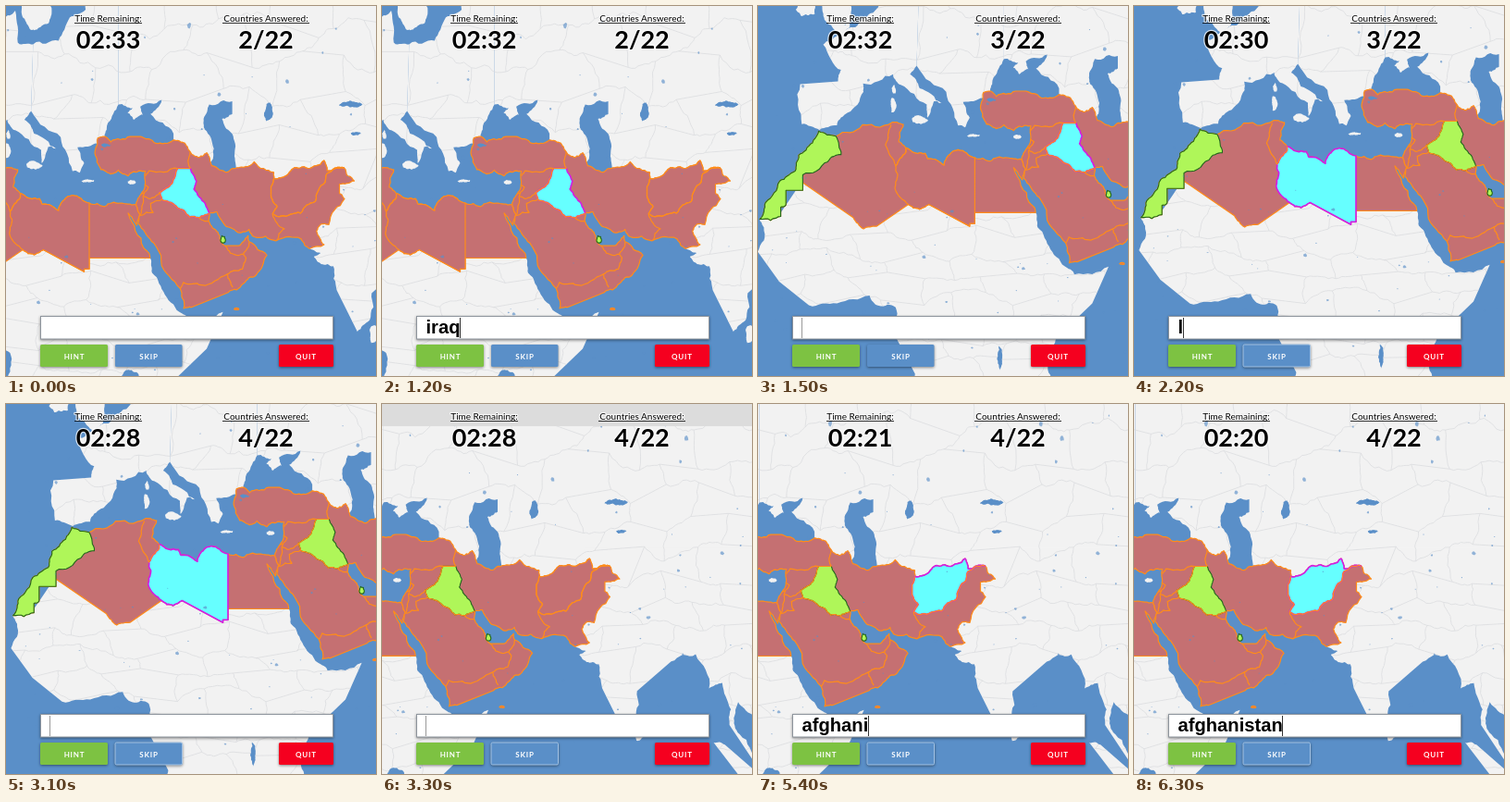
An HTML page that plays this animation: 400 px wide and 400 px high, repeating every 6500 ms.

```html
<!DOCTYPE html>
<html lang="en">
<head>
<meta charset="utf-8">
<title>Map quiz</title>
<style>
html, body { margin: 0; width: 100%; height: 100%; overflow: hidden; background: #5a8fc8; }
svg { display: block; width: 100vw; height: 100vh; }
.head, .btn { font-family: Lato, sans-serif; text-anchor: middle; }
.head { fill: #000; stroke: #fff; stroke-opacity: .75; stroke-width: 2.5; stroke-linejoin: round; paint-order: stroke; }
.label { font-size: 10px; }
.big { font-size: 27px; font-weight: 700; }
.btn { font-size: 8px; font-weight: 700; letter-spacing: .8px; fill: #fff; }
.typed { font: bold 20.2px "Liberation Sans", Arial, sans-serif; fill: #000; }
.shade { filter: drop-shadow(0 1px 1.5px rgba(0,0,0,.45)); }
</style>
</head>
<body>
<svg viewBox="0 0 400 400">
  <clipPath id="dry"></clipPath>
  <rect width="400" height="400" fill="#5a8fc8"/>
  <g id="world" stroke-linejoin="round">
    <g id="land" fill="#f2f2f2"></g>
    <g id="borders" fill="none" stroke="#d9dadd" stroke-width=".7" clip-path="url(#dry)"></g>
    <g id="states" fill="#c57072" stroke="#ff8c1a" stroke-width="1.2"></g>
    <g id="lakes" fill="#5a8fc8"></g>
    <rect id="strip" x="-250" y="-40" width="900" height="64" fill="#dcdcdc"/>
  </g>
  <g class="head">
    <text class="label" x="110.5" y="16.5">Time Remaining:</text>
    <text class="label" x="281" y="16.5">Countries Answered:</text>
    <text class="big" id="clock" x="110.5" y="45.5"></text>
    <text class="big" id="score" x="281" y="45.5"></text>
  </g>
  <path d="M74 18.5H147M234 18.5H328" stroke="#000" stroke-width=".8"/>
  <rect class="shade" x="37.5" y="335.5" width="316" height="24.5" fill="#fff" stroke="#8d949c"/>
  <text class="typed" id="typed" x="47.5" y="354"></text>
  <path id="caret" d="M0 337V359"/>
  <g class="shade">
    <rect x="37" y="366" width="73" height="24" rx="1.5" fill="#7dc242"/>
    <rect id="skip" x="118" y="366" width="72.5" height="24" rx="1.5" fill="#5a8fc8"/>
    <rect x="295" y="366" width="59" height="24" rx="1.5" fill="#f5001f"/>
  </g>
  <g class="btn">
    <text x="74" y="382">HINT</text>
    <text x="154.5" y="382">SKIP</text>
    <text x="324.5" y="382">QUIT</text>
  </g>
</svg>
<script>
const $ = id => document.getElementById(id);
const ring = (...parts) => parts.join();

// Seeded noise in 0..1 for a pair of numbers.
function noise(x, y) {
  const h = Math.sin(x * 127.1 + y * 311.7) * 43758.5;
  return h - Math.floor(h);
}

// Mercator
const project = ([lon, lat]) => [
  90 + (lon - 25) * 5.52,
  397 - 316.3 * Math.log(Math.tan(Math.PI / 4 + lat * Math.PI / 360))
];

// Roughens a segment the same way from either end, so neighbours still meet.
// Very long or axis-parallel segments are ruled desert borders.
function rough(a, b, depth = 3) {
  const [dx, dy] = [b[0] - a[0], b[1] - a[1]];
  if (!depth || !dx || !dy || Math.hypot(dx, dy) > 7) return [b];
  const [mx, my] = [(a[0] + b[0]) / 2, (a[1] + b[1]) / 2];
  const s = (noise(mx, my) - .5) * .26 * Math.sign(dx);
  const m = [mx - dy * s, my + dx * s];
  return [...rough(a, m, depth - 1), ...rough(m, b, depth - 1)];
}

const parse = text => text.split(",").map(p => p.split(" ").map(Number));

function trace(pts, closed) {
  const out = [pts[0]];
  for (let i = 1; i < pts.length + closed; i++) out.push(...rough(pts[i - 1], pts[i % pts.length]));
  return "M" + out.map(p => project(p).map(v => v.toFixed(1))).join("L") + (closed ? "Z" : "");
}

function add(parent, d, attrs = {}) {
  const el = document.createElementNS("http://www.w3.org/2000/svg", "path");
  el.setAttribute("d", d);
  for (const k in attrs) el.setAttribute(k, attrs[k]);
  return $(parent).appendChild(el);
}
const area = (parent, text) => add(parent, trace(parse(text), true));
const line = (parent, text) => add(parent, trace(parse(text), false), { fill: "none" });

// Uneven round patch for islands and lakes.
function blob(lon, lat, w, h) {
  const n = 9;
  return trace(Array.from({ length: n }, (_, i) => {
    const a = i / n * 2 * Math.PI, r = .75 + .45 * noise(lon + i, lat);
    return [lon + w * r * Math.cos(a), lat + h * r * Math.sin(a)];
  }), true);
}

// Continents, as a few key "lon lat" points
const africa = "-17.1 20.8,-16.3 19.3,-17.5 14.7,-13.3 9,-7.5 4.4,-2 4.8,4.4 6.3,6.2 4.3,9.5 4,9 -.8,13.3 -9,13 -12,41 -12,39.3 -7.5,39.2 -4.6,42 -1,48 4.8,51.2 11.9,44.5 10.4,43.2 11.6,39.8 15.2,37.3 19.3,36.9 22,25 25,0 26,-8.5 28,-13 22";
const westEurope = "14 54,11 54.2,10.5 57.7,8.2 56.8,8.6 54,4.5 52.3,1.6 50.6,-1.8 49.6,-4.7 48.4,-1.2 45,-1.8 43.4,-9.2 43,-8.9 37,-5.4 36.1,-2 36.8,.1 38.8,3.2 41.9,3.1 43.1,9 44.4,10.5 42.9,15.6 40,15.7 38,17 40.5,18.5 40.2,14.2 42.4,12.3 44.4,13.6 45.6";
const eastEurope = "13.6 45.6,19.4 41.9,21.7 36.8,23.1 36.5,24 38,22.7 40.4,26.7 41,28 42,28.7 44,30.7 46.5,30.7 60,24 60,24.3 57.8,21.2 57,19 54.4,14 54";
const northAsia = "30.7 60,30.7 46.5,33.5 46,32.5 45.4,33.7 44.4,35.5 45.1,35 46.2,39.2 47.1,37 45.2,41.5 42.4,41.5 41.5,44 39.5,48.9 38.2,49.4 40.2,47.6 43,47.4 44.5,48.5 46.5,53 46.9,53 45.2,51 44.5,52.7 42.6,53.5 39.8,53.9 37,61 35.5,105 35,105 60";
const southAsia = "68.2 23.7,70.3 22.9,69 22.2,70.4 20.9,72.8 20.5,73.5 16,77.5 8.1,79.9 10.3,80.3 15.5,87 21,91.8 22.3,94.4 16,97 17,98.7 12,98.4 9,103.5 1.4,100.4 7.2,99.3 9.3,100.1 13.4,103.5 10.6,105 10,105 40,70 40";
const sumatra = "95.3 5.6,97.5 5.2,103.5 0,103.5 -4,100.3 -.9";
for (const text of [africa, westEurope, eastEurope, northAsia, southAsia, sumatra]) {
  area("land", text);
  area("dry", text);
}
const islands = [[-2, 53, 3, 3.2], [-8, 53.3, 2, 1.5], [14.8, 58, 3, 2.6], [14.2, 37.6, 1.5, .7], [9, 40, .6, 1.1],
  [9.1, 42.2, .4, .7], [24.9, 35.2, 1.3, .25], [33.2, 35, .9, .4], [80.8, 7.7, 1, 1.7]];
islands.forEach(i => add("land", blob(...i)));

// Faint border network: a jittered brick pattern over dry land
const node = (i, j) => [i * 6 + 4 * noise(i, j), j * 4.2 + 3 * noise(j, i + 40)];
for (let i = -4; i < 18; i++) for (let j = -3; j < 14; j++) {
  add("borders", trace([node(i, j), node(i + 1, j)], false));
  if ((i + j) % 2) add("borders", trace([node(i, j), node(i, j + 1)], false));
}

// Shared edges of the quiz countries
const moroccoEdge = "-8.7 27.3,-8.7 26,-12 26,-12 23.4,-13 23,-13 21.3,-17.1 20.8,-16 23.8,-13.2 27.6,-10.2 29.3,-9.5 32,-6.8 34,-5.6 35.9,-2.2 35.1";
const libyaCoast = "11.5 33.2,15.3 32.3,15.8 31.4,19 30.3,20.1 32.1,21.7 32.9,25 31.6";
const libyaSouth = "25 20,24 20,24 19.5,16 23.5,14.2 22.6,12 23.5";
const egyptEdge = "28 31,31 31.6,34.2 31.3,34.9 29.5,34.3 27.8,32.6 29.9,35.6 23.9,36.9 22,25 22";
const turkeyCoast = "34.9 29.5,34.2 31.3,34.9 32.8,35.9 34.6,36 36.7,34.7 36.8,32.6 36,30.7 36.9,29.2 36.3,27.3 37,26.1 39.5,26.7 41.8,28 42,29.2 41.2,33 42,35 42,38 41,41.5 41.5,43.5 41.1,44.8 39.7";
const iranNorth = "46.5 38.9,48 39.6,49 37.6,52 36.6,53.9 37.3,57.3 38.2,61.1 36.6";
const afghanNorth = "61.2 35.6,63.2 35.9,64.8 37.1,67.8 37.2,71 38.4,71.6 36.8,74.9 37.3";
const afghanEast = "74.9 37.3,71.6 36.4,71.2 35,69.3 31.9,66.4 29.9,62.5 29.4,60.9 29.8";
const afghanWest = "60.9 29.8,61.8 31,60.6 33,60.6 34.3,61.2 35.6";
const pakistanEdge = "76.9 35.2,74 34.7,74 33.2,75 32.3,71.9 27.9,70.4 28,69.5 26.8,71 24.4,68.2 23.7,66.5 25.4,61.6 25.1";
const gulfCoast = "57.3 25.8,56.3 27.1,54.6 26.5,51.5 27.9,50 30.1,48.5 29.9,48.4 28.5,50.2 26.6,51.6 24.2,54.2 24.2,56.1 26,56.4 24.9";
const arabiaCoast = "59.8 22.5,57.7 18.9,55.2 17.3,52.2 15.6,45 12.8,43.5 12.6,42.8 16.4,39.1 21.4,37.2 25,34.6 28.1";
const iraqEast = "44.8 37.2,46 35.1,45.5 33.9,47.7 31.5,48.5 29.9";
const iraqWest = "48.5 29.9,46.5 29.1,44.7 29.2,42 31.1,39.2 32.2,38.8 33.4,41.2 34.8,42.3 37.2,44.8 37.2";

area("states", ring(moroccoEdge, "3 36.9,9.8 37.3,11 37,10.1 34.2", libyaCoast, egyptEdge, libyaSouth, "5.8 19.5,3.2 19,1.2 21.1"));
area("states", ring(turkeyCoast, iranNorth, afghanNorth, pakistanEdge, gulfCoast, arabiaCoast));
add("states", blob(53.9, 12.5, .5, .15));
const shapes = {
  afghanistan: area("states", ring(afghanNorth, afghanEast, afghanWest)),
  iraq: area("states", ring(iraqEast, iraqWest)),
  libya: area("states", ring(libyaCoast, libyaSouth, "9.4 26.2,9.9 28.7,9.5 30.2,11.5 32.5")),
  morocco: area("states", ring(moroccoEdge, "-1.2 32.1,-3.8 30.9,-8.7 28.7")),
  qatar: add("states", blob(51.2, 25.3, .4, .7))
};
const inner = [
  iraqWest, afghanWest, afghanEast,
  "8.6 36.9,7.5 33.7,9.5 30.2,11.5 32.5,11.5 33.2",
  "36 36,36.7 36.8,42.3 37.2",
  "44.8 39.7,44.4 38,44.8 37.2",
  "35.1 33.1,35.8 33.3,36.6 34.2,35.9 34.6",
  "35 29.5,35.5 31.5,35.8 33.3",
  "35.6 32.7,36.8 32.3,38.8 33.4",
  "35 29.5,37.5 30,37 31.5,39.2 32.2",
  "46.5 29.1,47.6 28.5,48.4 28.5",
  "42.8 16.4,43.4 17.5,47 17,52 19,53.1 16.6",
  "52 19,55 20,55.7 22,55.2 22.7,56.4 24.9",
  "55.2 22.7,52.6 22.9,51.6 24.2",
  "60.9 29.8,63.2 27.2,61.6 25.1"
];
inner.forEach(text => line("states", text));

const lakes = [[60.2, 45.4, .9, 1.2], [76, 46.5, 2.4, .4], [77.2, 42.4, 1, .25], [33, -1, 1.6, 1.5],
  [29.9, -6, .4, 2.6], [28.2, 40.7, 1, .22]];
lakes.forEach(l => add("lakes", blob(...l)));
for (let i = 0; i < 150; i++) {
  const size = .08 + .25 * noise(i, 3) ** 3;
  add("lakes", blob(-16 + 118 * noise(i, 1), -9 + 66 * noise(i, 2), size * 1.3, size), { opacity: .65 });
}

const looks = {
  open: ["#c57072", "#ff8c1a", 1.2],
  done: ["#aff659", "#22661c", 1.1],
  now: ["#66ffff", "#d31fe0", 1.7]
};
function paint(name, look) {
  ["fill", "stroke", "stroke-width"].forEach((k, i) => shapes[name].setAttribute(k, looks[look][i]));
}
paint("morocco", "done");
paint("qatar", "done");

const LOOP = 6500;
const PAN = 250;
const clocks = [[0, 33], [700, 32], [1600, 31], [2100, 30], [2700, 29], [3100, 28], [3700, 21], [5700, 20]];
const words = [
  { text: "iraq", from: 300, gap: 200, sent: 1360, move: [150, -51] },
  { text: "libya", from: 2200, gap: 180, sent: 3100, move: [-270, 51] },
  { text: "afghanistan", from: 3800, gap: 230, sent: LOOP, move: [0, 0] }
];

// Quartic ease-out
const ease = p => 1 - (1 - Math.min(1, Math.max(0, p))) ** 4;

function draw(time) {
  const t = Math.floor(time % LOOP / 100) * 100;

  let x = 0, y = 0;
  for (const { sent, move } of words) {
    const p = ease((t - sent) / PAN);
    x += move[0] * p;
    y += move[1] * p;
  }
  $("world").setAttribute("transform", `translate(${x} ${y})`);

  // The next country lights up once the pan has settled.
  const [first, second] = words.map(w => t >= w.sent + PAN + 50);
  paint("iraq", first ? "done" : "now");
  paint("libya", second ? "done" : first ? "now" : "open");
  paint("afghanistan", second ? "now" : "open");
  $("strip").style.display = t >= words[1].sent && !second ? "" : "none";

  $("clock").textContent = "02:" + clocks.filter(c => c[0] <= t).pop()[1];
  $("score").textContent = 2 + words.filter(w => t >= w.sent).length + "/22";

  const word = words.find(w => t < w.sent);
  const shown = word.text.slice(0, Math.max(0, Math.floor((t - word.from) / word.gap) + 1));
  $("typed").textContent = shown;
  const width = shown ? $("typed").getComputedTextLength() : 0;
  $("caret").setAttribute("transform", `translate(${Math.round(47 + width) + .5} 0)`);
  $("caret").setAttribute("stroke", shown ? "#333" : "#999");
  $("caret").style.display = t < words[0].from ? "none" : "";
  $("skip").setAttribute("stroke", t < 1900 ? "none" : "#a3c3e4");
}

const start = performance.now();
function tick() {
  draw(performance.now() - start);
  requestAnimationFrame(tick);
}
tick();
</script>
</body>
</html>
```
